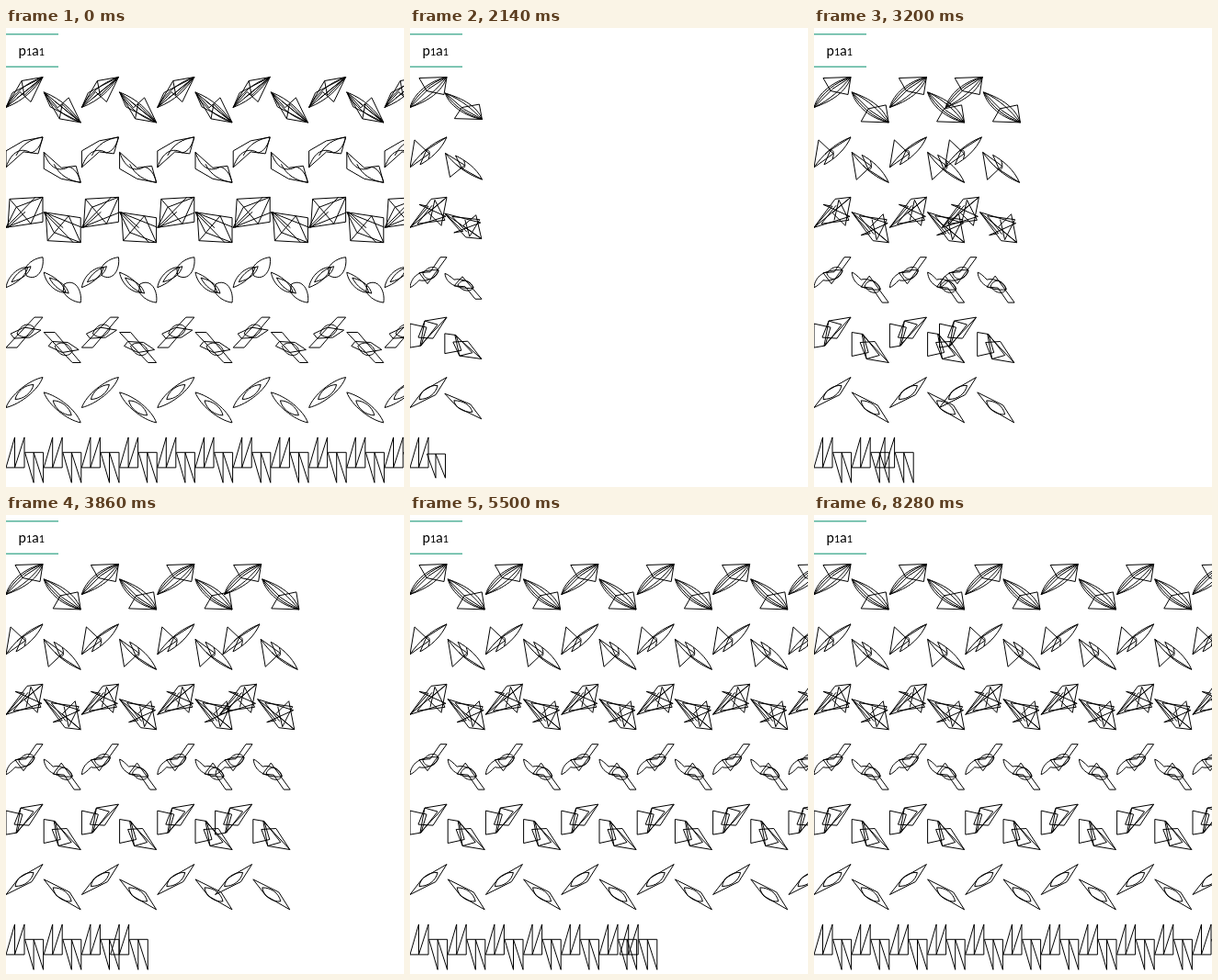
Recreate the animation shown at these times as an HTML page with a canvas. Size 433 by 500 pixels, loop 8380 ms.

```html
<!DOCTYPE html>
<html lang="en">
<head>
<meta charset="utf-8">
<title>p1a1</title>
<style>
html, body { margin: 0; width: 100%; height: 100%; overflow: hidden; background: #fff; }
canvas { display: block; }
</style>
</head>
<body>
<canvas id="stage" width="433" height="500"></canvas>
<script>
const ctx = document.getElementById('stage').getContext('2d');
const LOOP = 8380, CLEAR = 820, LOAD = 1000, GLIDE = 1340;
const TOP = 53.5, ROW_STEP = 65.4, AXIS = 24.7, SHIFT = 41.2, CELLS = 11;

const triangles = 'M0 33L9.5 0V33ZM9.5 33L20 0V33Z';

// One motif per row, in a box of about 41 by 33.
const before = [
  'M0 33L17 4L40 0L27 27L15 16ZM0 33L40 0L7 17ZM0 33C8 18 22 6 40 0C30 14 20 25 0 33M17 4L20 20L40 0L12 23',
  'M0 15L19 4L40 0L35 18L19 16L0 33ZM0 33C6 15 17 11 27 17C33 16 38 9 40 0C27 2 17 8 11 20',
  'M4 2L40 0V27L0 33L32 0M4 2L27 29L40 0L11 11L0 33L40 17M4 2L2 33L21 16',
  'M0 33C2 20 14 10 24 11C20 23 10 29 0 33ZM6 27C11 17 19 12 27 10C25 18 18 24 6 27M21 12C25 5 32 1 40 0C42 13 34 27 22 20Z',
  'M31 0H40L12 33H0ZM5 18L20 11L38 14L26 22L9 23ZM12 18C16 7 26 5 31 12C27 22 18 24 12 18',
  'M0 33C5 19 25 3 40 0C35 14 16 29 0 33ZM10 24C12 15 21 8 30 8C28 17 19 24 10 24Z'
];
const after = [
  'M0 33C4 18 21 4 40 0C35 16 20 26 0 33ZM0 33C10 16 23 6 40 0C29 13 19 24 0 33M10 1L40 0L37 19L18 15ZM0 33L20 13L40 0',
  'M5 3L0 33L21 18ZM0 33C9 20 22 7 40 0C34 14 22 24 11 30L18 14L40 0M12 19C18 11 24 13 20 24',
  'M0 33L23 2L40 0L34 31L20 17L40 0ZM10 8L39 21L0 33L20 10ZM22 25L27 3L38 25L8 29L24 9',
  'M0 33C1 21 11 13 31 14C29 23 17 27 10 25C6 29 3 32 0 33M33 0H40L19 29L10 17L22 16ZM14 18C19 9 29 9 31 15C27 25 18 27 14 18',
  'M0 7L18 11L12 31L0 33ZM40 0L16 4L11 31ZM40 0L25 23L9 22L16 4L30 8L12 31',
  'M0 33L14 15L40 0L28 19ZM10 24C11 15 21 8 30 9C28 18 20 24 10 24Z'
];
const motifs = set => [...set, triangles].map(d => new Path2D(d));
const oldSet = motifs(before), newSet = motifs(after);

// Per row: when the glide ends, and the time of each translation after it.
const timing = [[2200, 576], [2197, 581], [2213, 584], [2209, 597], [2212, 597], [2212, 597], [2233, 590]];

function copy(path, x, y, flip = 1) {
  const placed = new Path2D();
  placed.addPath(path, new DOMMatrix([1, 0, 0, flip, x, y + AXIS * (1 - flip)]));
  ctx.stroke(placed);
}

function drawRow(path, row, steps) {
  const y = TOP + row * ROW_STEP;
  const shift = row === 6 ? SHIFT / 2 : SHIFT;
  if (steps < 1) {
    copy(path, 0, y);
    copy(path, shift * steps, y, 1 - 2 * steps);
    return;
  }
  const pair = n => {
    copy(path, 2 * shift * n, y);
    copy(path, 2 * shift * n + shift, y, -1);
  };
  for (let n = 0; n < Math.floor(steps); n++) pair(n);
  if (steps < CELLS) pair(steps - 1);
}

function stepsAt(t, row) {
  const [end, period] = timing[row];
  const steps = t < end ? (t - GLIDE) / (end - GLIDE) : 1 + (t - end) / period;
  return Math.min(CELLS, Math.max(0, steps));
}

function drawLabel() {
  ctx.fillStyle = '#56b39b';
  ctx.fillRect(0, 6, 57, 1.5);
  ctx.fillRect(0, 41.5, 57, 1.5);
  ctx.fillStyle = '#000';
  let x = 13.5;
  for (const ch of 'p1a1') {
    ctx.font = `${ch === '1' ? 11 : 15}px Lato, sans-serif`;
    ctx.fillText(ch, x, 30);
    x += ctx.measureText(ch).width;
  }
}

function drawStatus(t) {
  const alpha = Math.min((t - LOAD) / 200, (1800 - t) / 220, 1);
  if (alpha <= 0) return;
  ctx.globalAlpha = alpha;
  ctx.fillStyle = '#ffd95b';
  ctx.strokeStyle = '#d8b84e';
  ctx.beginPath();
  ctx.roundRect(-1, 486.5, 268.5, 20, 3);
  ctx.fill();
  ctx.stroke();
  ctx.font = '10px "Open Sans", sans-serif';
  ctx.fillStyle = '#b39a4c';
  ctx.fillText('Waiting for cache...', 2.5, 497);
  ctx.fillStyle = '#fff';
  ctx.fillText('Waiting for cache...', 2.5, 496.4);
  ctx.globalAlpha = 1;
}

function frame(now) {
  const t = now % LOOP;
  ctx.fillStyle = '#fff';
  ctx.fillRect(0, 0, 433, 500);
  if (t < CLEAR || t >= LOAD) {
    drawLabel();
    ctx.strokeStyle = '#000';
    ctx.lineWidth = 1;
    const old = t < CLEAR;
    (old ? oldSet : newSet).forEach((path, row) => drawRow(path, row, old ? CELLS : stepsAt(t, row)));
    drawStatus(t);
  }
  requestAnimationFrame(() => frame(performance.now() - start));
}
const start = performance.now();
frame(0);
</script>
</body>
</html>
```
